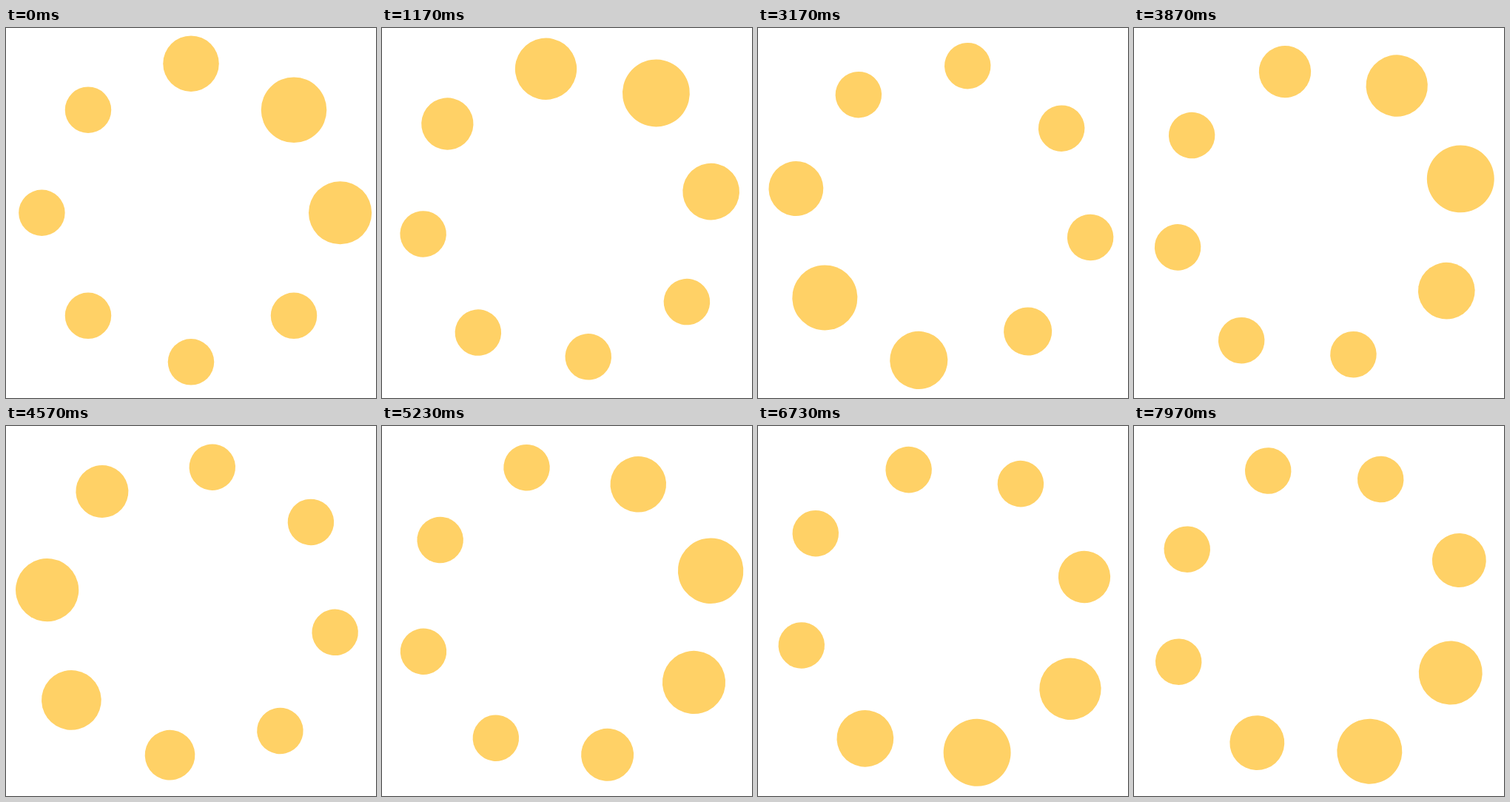
Recreate the animation shown at these times as an HTML page with a canvas. Size 500 by 500 pixels, loop 8 s.

```html
<!DOCTYPE html>
<html lang="en">
<head>
<meta charset="utf-8">
<title>Ring of pulsing dots</title>
<style>
html, body { margin: 0; width: 100%; height: 100%; overflow: hidden; background: #fff; }
canvas { display: block; width: 100vw; height: 100vh; }
</style>
</head>
<body>
<canvas id="stage" width="500" height="500"></canvas>
<script>
const ctx = document.getElementById('stage').getContext('2d');

const LOOP = 8000;      // ms
const FPS = 30;
const FRAMES = LOOP * FPS / 1000;
const CYCLE = 43;       // frames per round of pulses, during which the ring turns 45 degrees
const STAGGER = 5;      // frames between neighbouring pulses
const RISE = 11, FALL = 12;
const DOTS = 8;
const SMALL = 31.25, GROW = 0.5;
const AXIS = 201.6, DIAGONAL = 196.6;
const STEP = Math.PI / 4;

function pulse(age) {
  if (age < RISE) return age / RISE;
  return Math.max(0, 1 - (age - RISE) / FALL);
}

function draw(frame) {
  ctx.setTransform(1, 0, 0, 1, 0, 0);
  ctx.fillStyle = '#fff';
  ctx.fillRect(0, 0, 500, 500);
  ctx.translate(250, 250);
  ctx.rotate(frame / CYCLE * STEP);
  ctx.translate(0, -0.25);
  ctx.fillStyle = '#ffd166';
  for (let i = 0; i < DOTS; i++) {
    const angle = (i + 3) * STEP;   // clockwise from the top
    const dist = i % 2 ? AXIS : DIAGONAL;
    const age = (frame - i * STAGGER + CYCLE) % CYCLE;
    const r = SMALL * (1 + GROW * pulse(age));
    ctx.beginPath();
    ctx.arc(dist * Math.sin(angle), -dist * Math.cos(angle), r, 0, 2 * Math.PI);
    ctx.fill();
  }
}

const start = performance.now();

function tick() {
  const t = (performance.now() - start) % LOOP;
  // frame starts are rounded to 10 ms
  draw(Math.min(FRAMES - 1, Math.floor((t + 5) * FPS / 1000)));
  requestAnimationFrame(tick);
}
tick();
</script>
</body>
</html>
```
